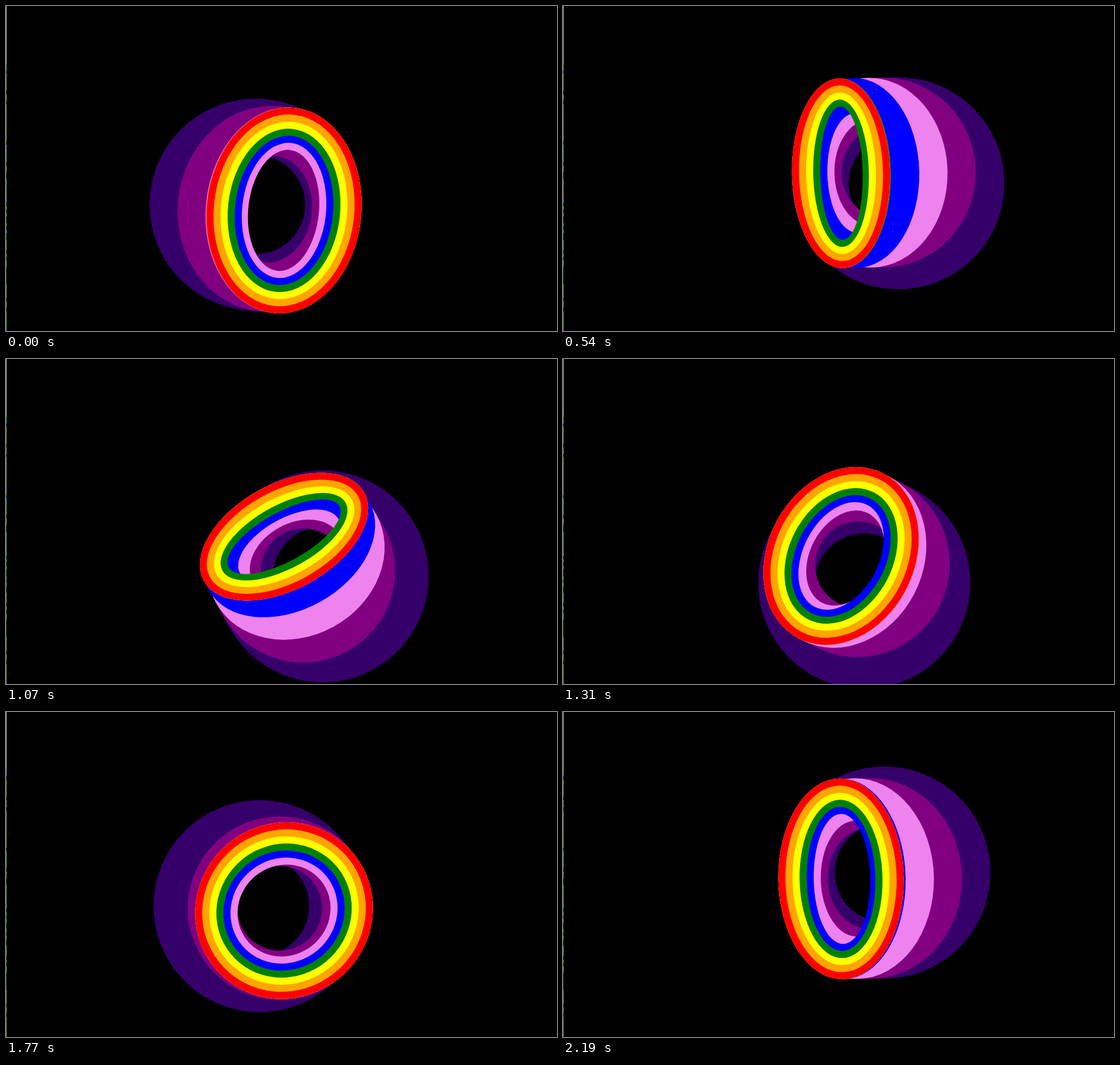
Animation, 974 px wide and 575 px high, one loop 2290 ms. Source, as an HTML page with a canvas:

```html
<!DOCTYPE html>
<html lang="en">
<head>
<meta charset="utf-8">
<title>Rainbow rings</title>
<style>
  html, body { margin: 0; width: 100%; height: 100%; overflow: hidden; background: #000; }
  canvas { display: block; }
</style>
</head>
<body>
<canvas id="stage" width="974" height="575"></canvas>
<script>
const ctx = document.getElementById('stage').getContext('2d');
const COLORS = ['#36006a', 'purple', 'violet', 'blue', 'green', 'yellow', 'orange', 'red'];
const RADIUS = 187.5;   // rear ring
const STEP = 25;        // how far each ring may shrink towards the front
const BAND = 12.5;      // visible width of one colour

// How long each picture is held, in ms
const HOLDS = [120, 150, 120, 150, 120, 150, 120, 140, 120, 120, 150, 160, 150, 150, 120, 150, 100];
const LOOP = HOLDS.reduce((sum, hold) => sum + hold);

// Key points of the rear ring: time, x, y, spin in degrees
const PATH = [
  [0, 441.5, 351.5, 5.8],
  [120, 462.5, 296.5, 46],
  [270, 529.5, 264.5, 90.8],
  [390, 571.5, 276.5, 130],
  [660, 600.5, 343.5, 218],
  [810, 584.5, 367, 267],
  [1310, 532.5, 396, 387.3],
  [1620, 475.5, 400, 457],
  [1770, 448.5, 343.5, 501],
  [2040, 516.5, 258, 581.8],
  [2190, 568, 284, 629]
];

// Smooth curve through the key points
function follow(t, column) {
  const last = PATH.length - 1;
  const slope = i => {
    const a = PATH[Math.max(0, i - 1)], b = PATH[Math.min(last, i + 1)];
    return (b[column] - a[column]) / (b[0] - a[0]);
  };
  const i = Math.min(last - 1, PATH.findLastIndex(key => key[0] <= t));
  const [from, to] = [PATH[i], PATH[i + 1]];
  const span = to[0] - from[0], s = (t - from[0]) / span, r = 1 - s;
  return from[column] * r * r * (1 + 2 * s) + to[column] * s * s * (1 + 2 * r) +
    span * s * r * (slope(i) * r - slope(i + 1) * s);
}

// The front ring bobs up and down on one column
const front = t => ({ x: 491.5, y: 325 + 39 * Math.cos(0.349 + t * 2 * Math.PI / 1644) });

function ring(x, y, a, b, width, color) {
  ctx.beginPath();
  ctx.ellipse(x, y, a, b, 0, 0, Math.PI * 2);
  ctx.closePath();
  ctx.ellipse(x, y, Math.max(0, a - width), Math.max(0, b - width), 0, 0, Math.PI * 2);
  ctx.fillStyle = color;
  ctx.fill('evenodd');
}

// Along each axis of the spinning frame a ring shrinks while it moves to the front,
// so that one side stays in place.
function drawRings(t) {
  const x = follow(t, 1), y = follow(t, 2), spin = follow(t, 3) * Math.PI / 180;
  const goal = front(t), dx = goal.x - x, dy = goal.y - y;
  const u = dx * Math.cos(spin) + dy * Math.sin(spin);
  const v = dy * Math.cos(spin) - dx * Math.sin(spin);
  ctx.save();
  ctx.translate(x, y);
  ctx.rotate(spin);
  COLORS.forEach((color, k) => {
    const moveU = Math.min(STEP * k, Math.abs(u));
    const moveV = Math.min(STEP * k, Math.abs(v));
    ring(Math.sign(u) * moveU, Math.sign(v) * moveV, RADIUS - moveU, RADIUS - moveV,
      BAND * (COLORS.length - k), color);
  });
  ctx.restore();
}

// Thin speckled strip at the left edge
function drawStrip() {
  const tones = ['#1f5a35', '#86c232', '#72aee0', '#98a83a', '#2f5a3c', '#7fb52e'];
  let seed = 7;
  for (let y = 0; y < 575; y += 6) {
    seed = seed * 16807 % 2147483647;
    ctx.fillStyle = y < 100 ? '#d8d2b4' : tones[seed % tones.length];
    ctx.fillRect(0, y, 1, 6);
  }
}

function heldTime(t) {
  let begin = 0;
  for (const hold of HOLDS) {
    if (t < begin + hold) break;
    begin += hold;
  }
  return begin;
}

function draw(now) {
  ctx.fillStyle = '#000';
  ctx.fillRect(0, 0, 974, 575);
  drawStrip();
  drawRings(heldTime(now % LOOP));
}

const start = performance.now();
function tick() {
  draw(performance.now() - start);
  requestAnimationFrame(tick);
}
tick();
</script>
</body>
</html>
```
